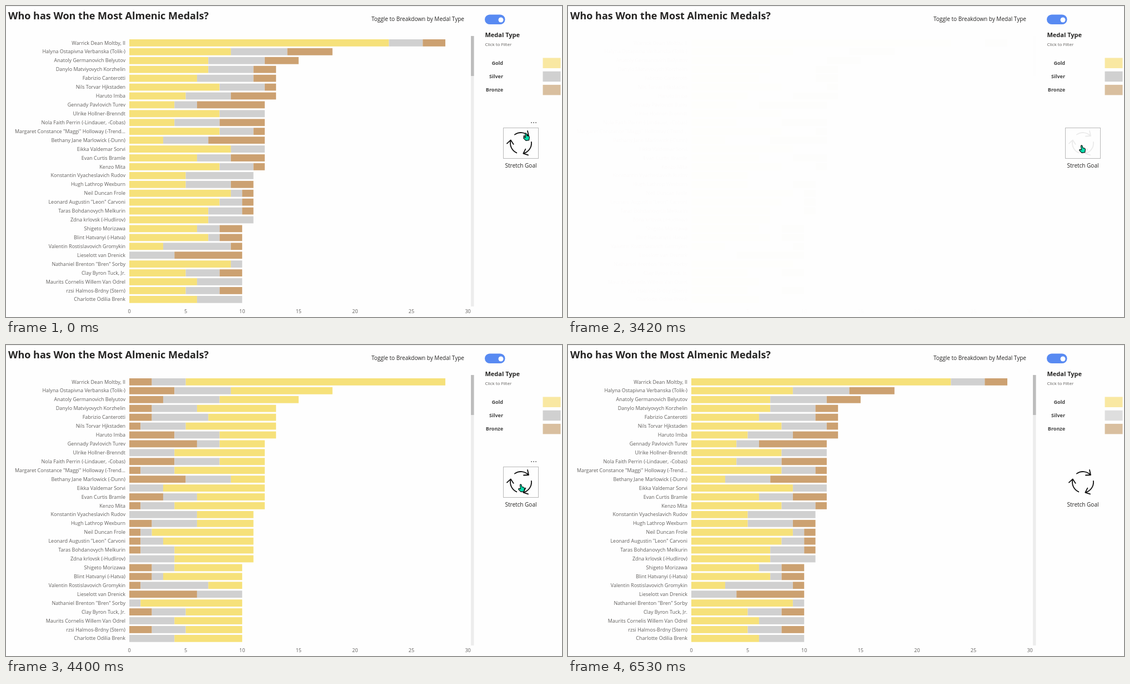
These frames come from a looping animation (1001x560 px, 7060 ms). An HTML page with a canvas:

```html
<!DOCTYPE html>
<html lang="en">
<head>
<meta charset="utf-8">
<title>Medal chart</title>
<style>
  html, body { margin: 0; width: 100%; height: 100%; overflow: hidden; background: #fefefe; }
  canvas { display: block; }
</style>
</head>
<body>
<canvas id="stage" width="1001" height="560"></canvas>
<script>
const ctx = document.getElementById('stage').getContext('2d');
const LOOP = 7060;
const COLORS = { g: '#f6e17a', s: '#d0d0d0', b: '#cca171' };

// name, gold, silver, bronze
const ROWS = [
  ['Warrick Dean Moltby, II', 23, 3, 2],
  ['Halyna Ostapivna Verbanska (Tolik-)', 9, 5, 4],
  ['Anatoly Germanovich Belyutov', 7, 5, 3],
  ['Danylo Matviyovych Korzhelin', 7, 4, 2],
  ['Fabrizio Canterotti', 6, 5, 2],
  ['Nils Torvar Hjkstaden', 8, 4, 1],
  ['Haruto Imba', 5, 4, 4],
  ['Gennady Pavlovich Turev', 4, 2, 6],
  ['Ulrike Hollner-Brenndt', 8, 4, 0],
  ['Nola Faith Perrin (-Lindauer, -Cobas)', 4, 4, 4],
  ['Margaret Constance "Maggi" Holloway (-Trend...', 8, 3, 1],
  ['Bethany Jane Marlowick (-Dunn)', 3, 4, 5],
  ['Eikka Valdemar Sorvi', 9, 3, 0],
  ['Evan Curtis Bramle', 6, 3, 3],
  ['Kenzo Mita', 8, 3, 1],
  ['Konstantin Vyacheslavich Rudov', 5, 6, 0],
  ['Hugh Lathrop Wexburn', 5, 4, 2],
  ['Neil Duncan Frole', 9, 1, 1],
  ['Leonard Augustin "Leon" Carvoni', 8, 2, 1],
  ['Taras Bohdanovych Melkurin', 7, 3, 1],
  ['Zdna krlovsk (-Hudlirov)', 7, 4, 0],
  ['Shigeto Morizawa', 6, 2, 2],
  ['Blint Hatvanyi (-Hatva)', 7, 1, 2],
  ['Valentin Rostislavovich Gromykin', 3, 6, 1],
  ['Lieselott van Drenick', 0, 4, 6],
  ['Nathaniel Brenton "Bren" Sorby', 9, 1, 0],
  ['Clay Byron Tuck, Jr.', 5, 3, 2],
  ['Maurits Cornelis Willem Van Odrel', 6, 4, 0],
  ['rzsi Halmos-Brdny (Stern)', 5, 3, 2],
  ['Charlotte Odilia Brenk', 6, 4, 0]
];

// Each cue overrides part of the state from its time on.
const CUES = [
  [0, { order: 'gsb', fade: 1, icon: 1, hover: 'card', cursor: ['hand', 931, 228], ring: null, silver: '#d0d0d0' }],
  [120, { cursor: ['hand', 925, 240] }],
  [1090, { cursor: ['hand', 926, 256] }],
  [1200, { cursor: ['beam', 933, 281], hover: 'label' }],
  [1330, { cursor: ['beam', 933, 284] }],
  [1480, { ring: [933, 284, 61] }],
  [1600, { ring: null }],
  [1750, { ring: [933, 284, 61] }],
  [1870, { ring: null }],
  [2170, { ring: [933, 285, 61], cursor: ['beam', 933, 285] }],
  [2300, { ring: [933, 285, 36] }],
  [2450, { ring: null }],
  [2570, { cursor: ['hand', 920, 251], hover: 'card' }],
  [2870, { cursor: ['hand', 920, 250] }],
  [3300, { ring: [926, 252, 6], fade: .3, icon: .4 }],
  [3420, { ring: null, fade: .015, icon: .08 }],
  [3540, { order: 'sbg', fade: .75, icon: .8 }],
  [3690, { ring: [926, 252, 6], fade: 1, icon: 1 }],
  [3840, { ring: null, order: 'bsg', fade: .015, icon: .08 }],
  [3960, { fade: .77, icon: .8 }],
  [4110, { fade: 1, icon: 1 }],
  [4270, { ring: [926, 252, 6] }],
  [4400, { ring: null, cursor: ['hand', 922, 250] }],
  [4540, { order: 'gsb', fade: .015, icon: .08 }],
  [4660, { fade: .98, icon: 1 }],
  [4790, { fade: 1 }],
  [4940, { cursor: ['hand', 916, 238] }],
  [5060, { cursor: ['arrow', 901, 174] }],
  [5210, { cursor: ['arrow', 893, 106], hover: 'legend', silver: '#dedede' }],
  [5450, { cursor: ['arrow', 890, 83] }],
  [5600, { ring: [894, 88, 61] }],
  [5750, { ring: null }],
  [5900, { cursor: ['arrow', 906, 55] }],
  [6020, { cursor: ['arrow', 970, 378] }],
  [6170, { cursor: ['arrow', 972, 470], hover: null }],
  [6290, { cursor: ['arrow', 973, 540] }],
  [6530, { cursor: null }]
];

const HAND = new Path2D('M3.4 2Q4.4 0 5.8 1.6L7 5.6L10 6.2Q11.6 6.8 11.4 8.6L10.6 13.6L5 14.4L1.2 10.6Q0 9 1.6 8.4L4.4 9Z');
const ARROW = new Path2D('M.7 .7V14L4 11L6.2 16.2L8.5 15.2L6.3 10.2H10.5Z');
const BEAM = new Path2D('M-3-5.5H3M-3 5.5H3M0-5.5V5.5');

function text(str, x, y, size, color = '#252423', weight = 400, align = 'left') {
  ctx.font = `${weight} ${size}px "Open Sans", "Noto Sans", sans-serif`;
  ctx.fillStyle = color;
  ctx.textAlign = align;
  ctx.fillText(str, x, y);
}

function rect(x, y, w, h, color) {
  ctx.fillStyle = color;
  ctx.fillRect(x, y, w, h);
}

function pill(x, y, w, h, color) {
  ctx.fillStyle = color;
  ctx.beginPath();
  ctx.roundRect(x, y, w, h, Math.min(w, h) / 2);
  ctx.fill();
}

function outline(x, y, w, h, color = '#b8b8b8') {
  ctx.lineWidth = 1;
  ctx.strokeStyle = color;
  ctx.strokeRect(x + .5, y + .5, w, h);
}

function dots(x, y) {
  for (const dx of [-4, 0, 4]) pill(x + dx - 1, y - 1, 2, 2, '#666');
}

function chart(order, fade) {
  ctx.globalAlpha = fade;
  ROWS.forEach(([name, g, s, b], i) => {
    const mid = 66.4 + i * 15.93, counts = { g, s, b };
    text(name, 215, mid + 3.1, 9, '#605e5c', 400, 'right');
    let x = 222;
    for (const medal of order) {
      const w = counts[medal] * 20.32;
      rect(x, mid - 6.4, w, 12.8, COLORS[medal]);
      x += w;
    }
  });
  for (let v = 0; v <= 30; v += 5) text(v, 222 + v * 20.32, 553, 9, '#605e5c', 400, 'center');
  rect(837, 54, 5.5, 487, '#ededed');
  rect(837, 54, 5.5, 72, '#bdbdbd');
  ctx.globalAlpha = 1;
}

function panel(silver) {
  rect(0, 0, 1001, 1, '#ececec');
  text('Who has Won the Most Almenic Medals?', 4, 23.5, 18, '#252423', 700);
  text('Toggle to Breakdown by Medal Type', 658, 26.5, 10);
  pill(862, 15.5, 36.5, 17.5, '#588af2');
  pill(886.5, 20.5, 9, 9, '#fff');
  text('Medal Type', 862.5, 55.5, 11, '#252423', 700);
  text('Click to Filter', 862.5, 72, 8, '#605e5c');
  [['Gold', '#f9e8a2'], ['Silver', silver], ['Bronze', '#d9bf9f']].forEach(([label, color], i) => {
    text(label, 895, 106 + i * 24.2, 9, '#444', 700, 'right');
    rect(966.5, 93.5 + i * 24.2, 32, 18.5, color);
  });
}

function cycleIcon(alpha) {
  ctx.save();
  ctx.globalAlpha = alpha;
  ctx.translate(927, 247);
  ctx.strokeStyle = '#111';
  ctx.lineWidth = 1.8;
  ctx.lineCap = ctx.lineJoin = 'round';
  for (let i = 0; i < 3; i++) {
    ctx.beginPath();
    ctx.arc(0, 0, 19, -2.2, -.75);
    ctx.moveTo(12, -22);
    ctx.lineTo(14, -13);
    ctx.lineTo(5, -12.5);
    ctx.stroke();
    ctx.rotate(Math.PI * 2 / 3);
  }
  ctx.restore();
}

function pointer([kind, x, y]) {
  ctx.save();
  ctx.translate(x, y);
  ctx.lineJoin = 'round';
  if (kind === 'beam') {
    ctx.lineWidth = 2;
    ctx.strokeStyle = '#1c7d5e';
    ctx.stroke(BEAM);
  } else {
    const shape = kind === 'hand' ? HAND : ARROW;
    ctx.fillStyle = '#05dfae';
    ctx.fill(shape);
    ctx.lineWidth = 1.2;
    ctx.strokeStyle = '#111';
    ctx.stroke(shape);
  }
  ctx.restore();
}

function ripple([x, y, r]) {
  ctx.beginPath();
  ctx.arc(x, y, r, 0, Math.PI * 2);
  ctx.lineWidth = r > 10 ? 2 : 1;
  ctx.strokeStyle = '#777';
  ctx.stroke();
}

function draw(now) {
  const t = now % LOOP;
  const state = Object.assign({}, ...CUES.filter(c => c[0] <= t).map(c => c[1]));
  const { order, fade, icon, hover, cursor, ring, silver } = state;

  rect(0, 0, 1001, 560, '#fefefe');
  chart(order, fade);
  panel(silver);
  if (hover === 'card') {
    outline(895, 219, 63, 55);
    if (fade > .5) dots(950, 210);
  } else if (hover === 'label') {
    outline(889, 275, 75, 24, '#c8c8c8');
    dots(957, 267);
  } else if (hover === 'legend') {
    outline(858, 43, 142, 122, '#c8c8c8');
  }
  cycleIcon(icon);
  text('Stretch Goal', 927, 290.5, 10, '#252423', 400, 'center');
  if (ring) ripple(ring);
  if (cursor) pointer(cursor);
  requestAnimationFrame(draw);
}
requestAnimationFrame(draw);
</script>
</body>
</html>
```
